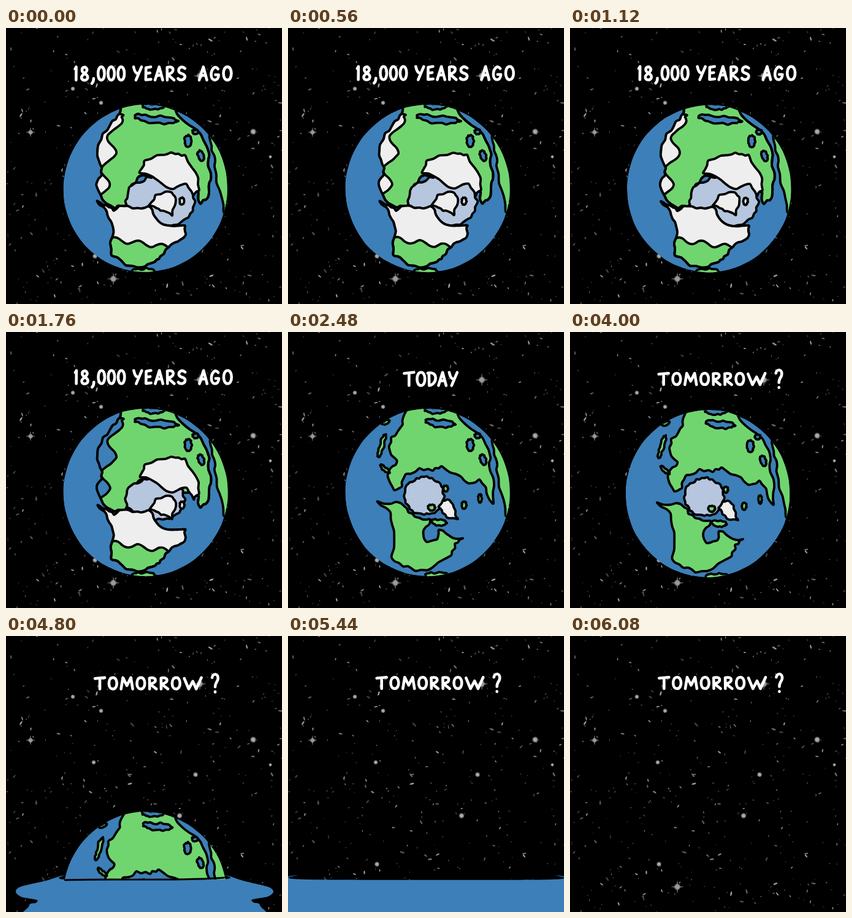
Write an HTML page with a canvas that moves like this. It is 450x450 px and loops after 6.16 s.

```html
<!DOCTYPE html>
<html lang="en">
<head>
<meta charset="utf-8">
<title>Melting Earth</title>
<style>
html, body { margin: 0; width: 100%; height: 100%; overflow: hidden; background: #000; }
canvas { display: block; width: 450px; height: 450px; }
</style>
</head>
<body>
<canvas id="stage" width="450" height="450" role="img" aria-label="18,000 years ago, today, tomorrow?"></canvas>
<script>
const ctx = document.getElementById('stage').getContext('2d');
const LOOP = 6160, STEP = 80;
const SEA = '#3d7fb8', LAND = '#71d56f', ICE = '#eeeeee', FLOE = '#b6c6de';
const HELD = [9, 25, 33, 35, 45, 49, 57, 69, 71, 73];
const POSES = [[-1, 1], [0, 0], [-3, 2]];

const lerp = (a, b, k) => a + (b - a) * k;
const ramp = (t, a, b) => Math.min(1, Math.max(0, (t - a) / (b - a)));
const mix = (a, b, k) => a.map((p, i) => [lerp(p[0], b[i][0], k), lerp(p[1], b[i][1], k)]);
const hash = i => { const v = Math.sin(i * 127.1 + 3.7) * 43758.5; return (v - Math.floor(v)) * 2 - 1; };
const pts = s => s.trim().split(/\s+/).map(p => p.split(',').map(Number));

// ---- key points of each coast, cold and warm; crinkle() adds the small bays
const eurasia = [
  pts(`195,115 186,138 174,152 158,172 149,200 154,222 156,240 148,256 158,280 178,293 194,290
    205,256 222,240 260,256 300,262 314,268 317,286 326,280 331,262 334,246 330,214 327,192
    310,165 280,141 262,115`),
  pts(`205,115 188,138 183,156 168,172 166,194 178,210 166,224 164,240 173,258 186,252 192,232
    214,222 236,226 250,219 274,232 294,247 312,240 324,262 335,280 336,250 328,214 327,192
    310,165 280,141 262,115`)];
const america = [
  pts(`149,282 164,289 176,298 192,290 214,293 233,291 244,309 264,322 292,322 293,336 280,348
    266,357 252,372 243,381 226,389 196,387 172,370 174,340 172,316 164,298`),
  pts(`145,276 160,280 184,279 196,294 214,303 232,306 221,324 226,342 243,338 246,323 262,332
    285,336 272,345 266,364 236,384 208,390 188,382 169,366 173,325 167,294`)];
const greenland = [
  pts('233,290 244,272 270,268 277,281 271,305 257,298 245,293'),
  pts('245,285 252,275 263,274 270,286 277,305 264,304 252,295')];
const africa = pts('332,176 346,186 380,230 380,300 355,300 349,265 340,225 336,200');
const northIce = pts(`218,236 226,216 258,207 276,205 292,207 310,236 315,264 306,273 294,254
  272,262 246,247`);

// centre, radii, tilt
const lakes = [[241, 127, 19, 5, 0], [297, 184, 6, 10, 0], [309, 169, 5, 4, 0], [318, 208, 5, 9, -.3]];
const isles = [[153, 185, 4, 20, .3], [158, 223, 10, 3, .7], [246, 310, 13, 5, .1], [257, 255, 4, 5, 0],
  [234, 286, 6, 5, 0], [313, 271, 3, 7, 0], [159, 147, 7, 3, -.4]];

function ring([x, y, rx, ry, tilt], n = 9) {
  return Array.from({ length: n }, (_, i) => {
    const a = i / n * 2 * Math.PI, u = rx * Math.cos(a), v = ry * Math.sin(a);
    return [x + u * Math.cos(tilt) - v * Math.sin(tilt), y + u * Math.sin(tilt) + v * Math.cos(tilt)];
  });
}

function crinkle(a) {
  return a.flatMap((p, i) => {
    const q = a[(i + 1) % a.length], dx = q[0] - p[0], dy = q[1] - p[1];
    const len = Math.hypot(dx, dy) || 1, size = Math.min(2.8, len * .14);
    return [0, 1, 2].map(j => {
      const off = j ? size * hash(i * 3 + j) : 0;
      return [p[0] + dx * j / 3 - dy / len * off, p[1] + dy * j / 3 + dx / len * off];
    });
  });
}

function trace(a, pose) {
  const n = a.length;
  const at = i => {
    const j = (i + n) % n;
    return [a[j][0] + .4 * hash(j + pose * 91), a[j][1] + .4 * hash(j + pose * 57)];
  };
  ctx.beginPath();
  ctx.moveTo(...at(0));
  for (let i = 0; i < n; i++) {
    const [p, q, r, s] = [at(i - 1), at(i), at(i + 1), at(i + 2)];
    ctx.bezierCurveTo(q[0] + (r[0] - p[0]) / 7, q[1] + (r[1] - p[1]) / 7,
      r[0] - (s[0] - q[0]) / 7, r[1] - (s[1] - q[1]) / 7, r[0], r[1]);
  }
  ctx.closePath();
}

function globe(t, pose) {
  const early = ramp(t, 1200, 1760), late = ramp(t, 1840, 2240);
  const blob = (a, fill) => {
    trace(crinkle(a), pose);
    ctx.fillStyle = fill;
    ctx.fill();
    ctx.stroke();
  };
  // land with a second colour on one side of a wavy edge
  const capped = (land, edge, fill) => {
    blob(land, LAND);
    if (late === 1) return;
    ctx.save();
    ctx.clip();
    trace(edge, pose);
    ctx.fillStyle = fill;
    ctx.fill();
    ctx.stroke();
    ctx.restore();
    trace(crinkle(land), pose);
    ctx.stroke();
  };
  const span = (from, to, f) => Array.from({ length: (to - from) / 5 + 1 }, (_, i) => f(from + i * 5));

  trace(ring([227.5, 261.5, 134, 136.5, .1], 22), pose);
  ctx.clip();
  ctx.fillStyle = SEA;
  ctx.fill();
  ctx.strokeStyle = '#000';
  ctx.lineWidth = 3.8;
  ctx.lineJoin = ctx.lineCap = 'round';

  blob(africa, LAND);
  const shore = span(140, 285, y => [170 - .2 * (y - 204) + 10 * Math.cos((y - 204) / 8.3) - 40 * late, y]);
  capped(mix(...eurasia, late), [[90, 140], ...shore, [90, 285]], t < 1440 ? ICE : SEA);
  blob(ring([lerp(245, 248, late), 148, lerp(37, 25, late), 6, .1]), SEA);
  lakes.forEach(l => blob(ring(l), SEA));
  blob(ring([lerp(225, 243, late), 398, 20, 7, 0]), LAND);

  const pack = [lerp(252, 243, early), lerp(282, 272, early), lerp(57, 49, early), lerp(42, 35, early), 0];
  const cap = [222, 267, 33, 31, 0];
  blob(ring(pack.map((v, i) => lerp(v, cap[i], late)), 16), FLOE);

  const front = span(130, 320, x => [x, 344 + .14 * (x - 172) + 4 * Math.sin(x / 6) - 70 * late]);
  capped(mix(...america, late), [[130, 200], ...front, [320, 200]], ICE);
  if (late < 1) blob(northIce.map(([x, y]) => [lerp(x, 262, late), lerp(y, 228, late)]), ICE);
  if (late > .6) isles.forEach(l => blob(ring(l), LAND));
  blob(mix(...greenland, late), ICE);
  blob(ring([287, 282, 4, 6, .1]), late < .5 ? ICE : LAND);
}

// ---- the flood: right half of the puddle edge, mirrored for the left
const BANK = pts('.58,0 .62,-7 .76,2 .95,12 .99,20 .95,28 .83,33 .84,38 .89,43 .87,80');
const SHORE = [...BANK, ...BANK.map(([x, y]) => [-x, y]).reverse()];

function flood(t) {
  const u = (t - 4000) / 800, drain = ramp(t, 5520, 6080);
  return {
    top: 470 - 73 * Math.pow(Math.min(1, u), 1.5) + 83 * Math.pow(drain, 1.5),
    half: lerp(Math.min(340, 134 + 78 * u ** 4), 60, drain ** .6)
  };
}

function earth(t, pose) {
  const calm = t < 2080 ? .25 : 1;
  const [dx, dy] = POSES[pose].map(v => v * calm);
  const sink = t > 4000 ? 161 * Math.pow((t - 4000) / 800, 1.2) : 0;
  const water = t > 4000 ? flood(t) : { top: 460, half: 0 };
  if (sink < 280) {
    ctx.save();
    ctx.beginPath();
    ctx.rect(0, 0, 450, water.top + 1);
    ctx.clip();
    ctx.translate(dx, dy + sink);
    globe(t, pose);
    ctx.restore();
  }
  if (!water.half) return;
  trace(SHORE.map(([x, y]) => [226 + x * water.half, water.top + y]), pose);
  ctx.fillStyle = SEA;
  ctx.fill();

  const rise = (water.top - 261.5 - sink) / 136;
  if (Math.abs(rise) >= 1) return;
  const chord = 132 * Math.sqrt(1 - rise * rise);
  ctx.beginPath();
  ctx.moveTo(226 - chord, water.top + 1);
  ctx.bezierCurveTo(226 - chord / 2, water.top - 2, 226 + chord / 2, water.top + 3, 226 + chord, water.top - 3);
  ctx.strokeStyle = '#000';
  ctx.lineWidth = 2.8;
  ctx.lineCap = 'round';
  ctx.stroke();
}

// ---- hand lettering: width, then strokes on a 10 by 10 box
const GLYPHS = {
  '0': [10.5, 'M5 0C-1.6 0-1.7 10 5 10C11.7 10 11.6 0 5 0Z'],
  '1': [5, 'M1 1.6L5 0L4.5 10'],
  '8': [11, 'M8.5 1.8C6-1 .2 .4 1.3 3C2.4 5.2 10.4 5.4 9.5 8.2C8.5 11-.4 10.6.4 7.8C1 5.4 9.6 4.6 8.5 1.8Z'],
  ',': [5, 'M7 8.8C7 10.5 5 11.8 1 12.6'],
  T: [16, 'M0 .8L10 0M5 .5L5 10'],
  O: [13, 'M4.6 0C-1.6.4-1.5 10 5 10C11.8 10 11.4-.6 4.6 0Z'],
  D: [12, 'M1.2.4L1.6 10M-.4.6C14-1.5 13 9 1.6 10'],
  A: [12.5, 'M0 10L5.4 0L10 10M2 6.6L8.4 6.2'],
  Y: [13, 'M0 0C1 3 2.5 5 5.2 5M10 0L3 10'],
  E: [9, 'M9.5 0L.8.6L.4 9.8L9.8 9.4M.6 5L8 4.6'],
  R: [12, 'M.8 10L.6.4C11-1.4 11.5 5 1.2 5.6L10 10'],
  S: [12, 'M9.4 1.2C5-1 0 .6 1 3.4C2 5.6 9.6 4.6 9.4 7.4C9 10 3 10.8 0 8.8'],
  G: [13, 'M8.6 1.6C4.6-1.8 0 2 0 6C0 11.2 9 11.4 9.4 6L5.4 6'],
  M: [19, 'M0 10L1.6 0L5 7L8.4 0L10 10'],
  W: [28, 'M0 .6L2.6 10L5 3.2L7 10L10 0'],
  '?': [10, 'M0 0C1-4 10.5-4 9.6 1C9 4 5 4 5 8.2M5 12.4L5 12.7']
};
function lettering(top, height, ...words) {
  const path = new Path2D();
  for (let [text, x, gap] of words) for (const c of text) {
    const [width, strokes] = GLYPHS[c];
    path.addPath(new Path2D(strokes), new DOMMatrix([width / 10, 0, 0, height / 10, x, top]));
    x += width + gap;
  }
  return path;
}
const past = lettering(63, 21.5, ['18,000', 112, 5.7], ['YEARS', 208, 6.5], ['AGO', 315, 7]);
const today = lettering(66, 21.5, ['TODAY', 189, 5]);
const next = lettering(67.5, 18.5, ['TOMORROW', 145, 6.8], ['?', 336, 0]);

function title(t, pose) {
  ctx.save();
  ctx.translate(Math.sin(pose * 2.1) * .4, Math.cos(pose * 2.1) * .4);
  ctx.strokeStyle = '#fff';
  ctx.lineWidth = 4.6;
  ctx.lineJoin = ctx.lineCap = 'round';
  ctx.stroke(t < 2080 ? past : t < 4000 ? today : next);
  ctx.restore();
}

// ---- night sky, painted once
function paintSky() {
  const sky = document.createElement('canvas');
  sky.width = sky.height = 450;
  const g = sky.getContext('2d');
  let seed = 18;
  const rnd = () => (seed = seed * 16807 % 2147483647) / 2147483647;
  const speck = (x, y, rx, ry, turn, shade) => {
    g.fillStyle = `rgb(${shade},${shade},${shade})`;
    g.beginPath();
    g.ellipse(x, y, rx, ry, turn, 0, 7);
    g.fill();
  };
  g.fillStyle = '#000';
  g.fillRect(0, 0, 450, 450);
  for (let i = 0; i < 420; i++) {
    const size = rnd() ** 4;
    speck(rnd() * 450, rnd() * 450, .6 + size * 3 + rnd() * .8, .5 + size * .9, rnd() * 3.1, 60 + rnd() * 110 | 0);
  }
  const glow = (x, y, r, spikes) => {
    const soft = g.createRadialGradient(x, y, 0, x, y, r);
    soft.addColorStop(0, '#bbb');
    soft.addColorStop(.55, '#999');
    soft.addColorStop(1, 'rgba(120,120,120,0)');
    g.fillStyle = soft;
    g.fillRect(x - r, y - r, 2 * r, 2 * r);
    if (!spikes) return;
    speck(x, y, r * 1.7, .7, 0, 150);
    speck(x, y, .7, r * 1.7, 0, 150);
  };
  [[109, 99, 4], [403, 169, 5.5], [309, 226, 4.5], [283, 293, 5], [145, 372, 4.5], [143, 206, 4],
    [155, 122, 4], [431, 210, 3]].forEach(s => glow(...s));
  [[40, 170, 4.5], [316, 78, 6], [175, 409, 6]].forEach(s => glow(...s, true));
  return sky;
}
const sky = paintSky();

function draw(time) {
  let step = Math.floor(time % LOOP / STEP);
  if (HELD.includes(step)) step--;
  const t = step * STEP, pose = step % 3;
  ctx.drawImage(sky, 0, 0);
  if (t < 6080) earth(t, pose);
  title(t, pose);
}
const start = performance.now();
function tick() {
  draw(performance.now() - start);
  requestAnimationFrame(tick);
}
tick();
</script>
</body>
</html>
```
